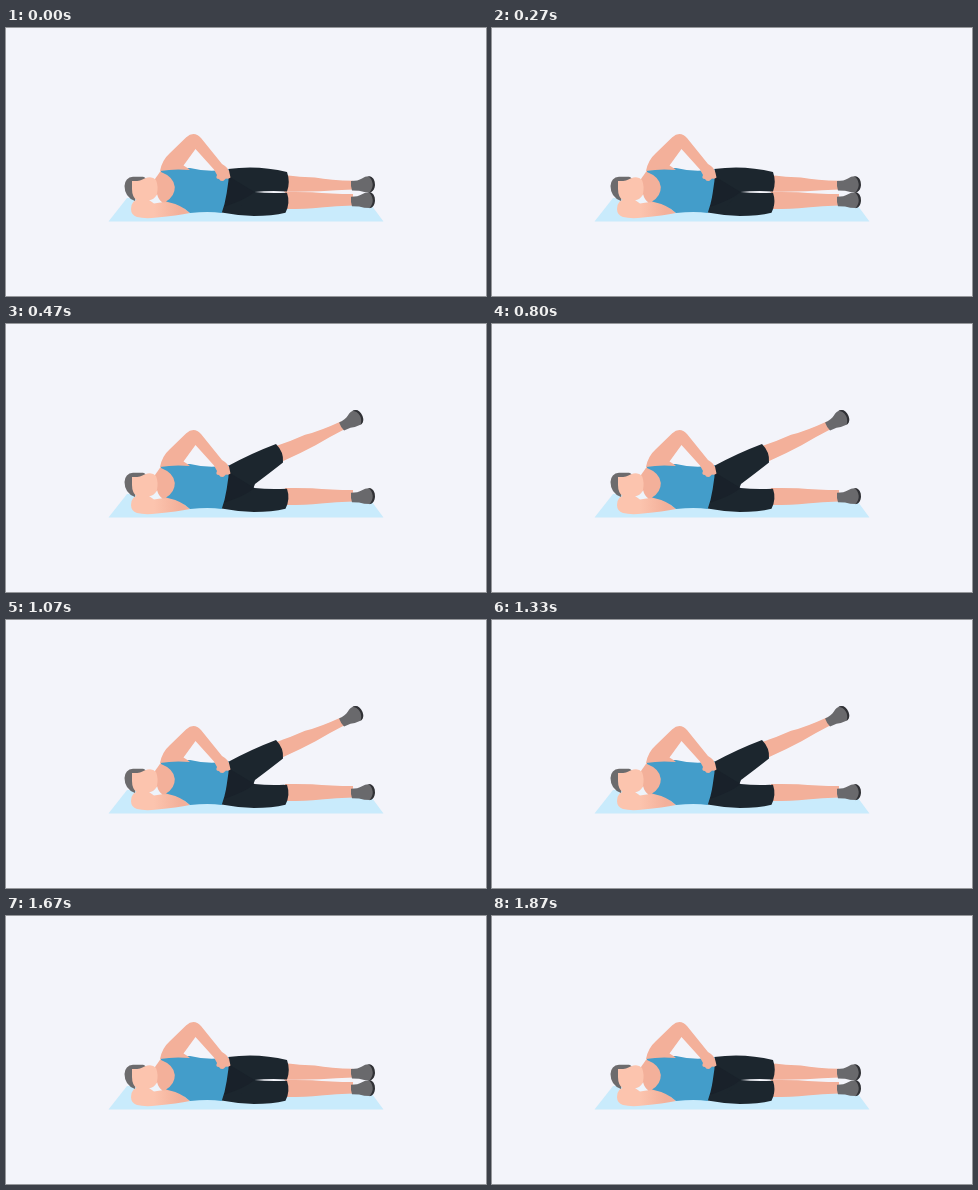
An HTML page that plays this animation: 480x268 px, repeating every 1.94 s.

```html
<!DOCTYPE html>
<html lang="en">
<head>
<meta charset="utf-8">
<title>Side-lying leg raise</title>
<style>
html, body { margin: 0; width: 100%; height: 100%; overflow: hidden; background: #f3f4fa; }
svg { display: block; width: 100%; height: 100%; }
.skin { fill: #f3b09a; }
.face { fill: #fcc4ae; }
.hair { fill: #6c6b6d; }
.shirt { fill: #439dca; }
.shorts { fill: #1c262e; }
.fold { fill: #19212a; }
.shoe { fill: #69696c; }
.sole { fill: #303135; }
.mat { fill: #c9ebfc; }
.gap { fill: #eef4fb; }
</style>
</head>
<body>
<svg viewBox="0 0 480 268">
  <defs>
    <g id="foot">
      <path class="shoe" d="M345 153 Q352 153 356 150.500 Q360 147.800 364 148.500 Q368.500 150 368.500 157 Q368 163 364 164.300 Q358 164.300 353 162.800 L346 162.500 Q344.500 158 345 153Z"/>
      <path class="sole" d="M362 148.300 Q369 148.500 369 157 Q368.500 163.500 363.500 164.500 Q367 160 366.700 156 Q366 150.500 362 148.300Z"/>
    </g>
    <linearGradient id="forearm" gradientUnits="userSpaceOnUse" x1="148" x2="174">
      <stop offset="0" stop-color="#fcc4ae"/>
      <stop offset="1" stop-color="#f3b09a"/>
    </linearGradient>
  </defs>

  <path class="mat" d="M102.500 193.400 L121 170 H360 L377.500 193.400Z"/>

  <!-- resting leg -->
  <path class="skin" d="M279 164 Q292 163.700 306 164.200 Q325 166 347 166 L347 177.500 Q330 178 315 179.500 Q300 181 279 181Z"/>
  <use href="#foot" y="15.800"/>
  <path class="shorts" d="M218 160 L248.500 164 Q264 165.800 281 164.700 Q284.500 175 279.500 184.800 Q266 188 248 188 Q231 187.500 215.500 184.500Z"/>

  <!-- moving leg -->
  <g id="leg">
    <path class="skin" d="M278 147 Q294 149.200 309 149.500 Q325 152.500 347 152.800 L347 161.500 Q330 162 314 163.300 Q297 164 278 163.700Z"/>
    <use href="#foot"/>
  </g>
  <path id="thigh" class="shorts"/>
  <path class="fold" d="M222 148 L248.500 164 Q239 172 217.500 179Z"/>

  <!-- neck, head and supporting arm -->
  <path class="skin" d="M149 151 L156 141 L172 142 V174 L158 177 L150 174Z"/>
  <path class="gap" d="M143 172 Q149 171 151 166 Q152.500 172 156.500 174.500 L149 177 L143 174Z"/>
  <path fill="url(#forearm)" d="M125 181 Q125 172 134 171 L143 172 L148 175.500 Q165 172.500 174 177 L184 185 Q171 187.500 151 189.500 Q139 191 131 189 Q125 187 125 181Z"/>
  <path class="hair" d="M129 173 Q118.500 169 118.500 158 Q119 149.500 127 148.800 L137 148.800 Q140 149.500 141 153 L130 165Z"/>
  <path class="face" d="M126 153 Q134 153.500 138.500 150.500 Q146 147.500 150 152 Q152.500 158 151 166 Q148 173 140 172.500 L131 172.500 Q126 169 126 161Z"/>

  <!-- torso -->
  <path class="shirt" d="M155 140 H184 Q204 145 223 141 Q223 153 220.700 165 Q219 176 215.700 185 Q203 183 184 185 Q176 177 160 173.500 Q169 168 168.800 159 Q168 149 155 144Z"/>

  <!-- bent arm -->
  <path class="skin" d="M154 143 Q156 132 164 125 L180 109.500 Q188 102.500 195 110 L216 136 Q223 140 223.500 145 L224.500 149.500 Q222 151.500 220 150.500 L217.500 152.800 Q214 153.500 213 151 Q209 151 211 147 L208 141.500 L189.500 121 L177.500 137.500 Q181 139.500 184 142 Q168 140.500 154 143Z"/>
</svg>
<script>
const LOOP = 1940, RAISE = 470, LOWER = 1470;
const THIGH = {
  down: "M222 141 Q252 136.800 281 144 Q284.500 154 281 163.400 Q264 162.200 248.500 164 L235 178 L219 178Z",
  up: "M222 142 Q246 129 270 120 Q278 128 277 138.500 Q265 148 249 160 Q247 168 235 178 L219 178Z"
};
const leg = document.getElementById("leg");
const thigh = document.getElementById("thigh");

function draw(ms) {
  const t = ms % LOOP;
  const up = t >= RAISE && t < LOWER;
  leg.setAttribute("transform", `rotate(${up ? -25.6 : 0} 219 152)`);
  thigh.setAttribute("d", up ? THIGH.up : THIGH.down);
}

const start = performance.now();
function tick() {
  draw(performance.now() - start);
  requestAnimationFrame(tick);
}
tick();
</script>
</body>
</html>
```
